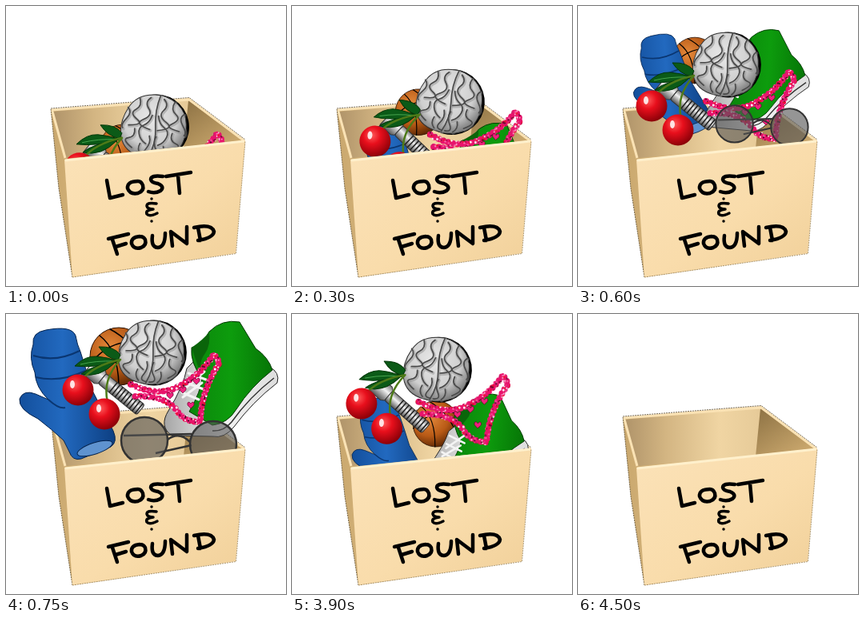
An HTML page that plays this animation: 350x350 px, repeating every 7.5 s.

```html
<!DOCTYPE html>
<html lang="en">
<head>
<meta charset="utf-8">
<title>Lost &amp; Found</title>
<style>
html, body { margin: 0; width: 100%; height: 100%; overflow: hidden; background: #fff; }
svg { display: block; width: 100vw; height: 100vh; }
.ink { fill: none; stroke: #000; stroke-linecap: round; stroke-linejoin: round; }
</style>
</head>
<body>
<svg viewBox="0 0 350 350" role="img" aria-label="Lost &amp; Found box">
<defs>
  <linearGradient id="front" x1="0" y1="0" x2="1" y2="1">
    <stop offset="0" stop-color="#fbe2b8"/><stop offset=".55" stop-color="#f9dcab"/><stop offset="1" stop-color="#f0cf98"/>
  </linearGradient>
  <linearGradient id="side" x1="0" y1="0" x2="1" y2="0">
    <stop offset="0" stop-color="#c9a76d"/><stop offset=".6" stop-color="#f0d19b"/><stop offset="1" stop-color="#f3d6a4"/>
  </linearGradient>
  <linearGradient id="backWall">
    <stop offset="0" stop-color="#b0946a"/><stop offset=".3" stop-color="#d3b582"/><stop offset=".7" stop-color="#f0d5a3"/><stop offset="1" stop-color="#e6ca98"/>
  </linearGradient>
  <linearGradient id="rightWall" x1="0" y1="0" x2=".8" y2="1">
    <stop offset="0" stop-color="#8c7143"/><stop offset="1" stop-color="#cdaa6f"/>
  </linearGradient>
  <radialGradient id="orange" cx=".35" cy=".35" r=".7">
    <stop offset="0" stop-color="#e58a3c"/><stop offset=".6" stop-color="#b85a16"/><stop offset="1" stop-color="#5a2604"/>
  </radialGradient>
  <linearGradient id="blue">
    <stop offset="0" stop-color="#134f9c"/><stop offset=".45" stop-color="#2269bf"/><stop offset="1" stop-color="#0d3f82"/>
  </linearGradient>
  <linearGradient id="green">
    <stop offset="0" stop-color="#0b850b"/><stop offset=".5" stop-color="#0d9c0d"/><stop offset="1" stop-color="#067506"/>
  </linearGradient>
  <linearGradient id="rubber">
    <stop offset="0" stop-color="#a5a5a5"/><stop offset=".5" stop-color="#f4f4f4"/><stop offset="1" stop-color="#ddd"/>
  </linearGradient>
  <linearGradient id="steel" x1="0" y1="0" x2="0" y2="1">
    <stop offset="0" stop-color="#777"/><stop offset=".4" stop-color="#f2f2f2"/><stop offset="1" stop-color="#555"/>
  </linearGradient>
  <radialGradient id="gray" cx=".42" cy=".38" r=".65">
    <stop offset="0" stop-color="#e8e8e8"/><stop offset=".65" stop-color="#cfcfcf"/><stop offset="1" stop-color="#777"/>
  </radialGradient>
  <radialGradient id="red" cx=".38" cy=".32" r=".7">
    <stop offset="0" stop-color="#ff5a5a"/><stop offset=".4" stop-color="#e80f1c"/><stop offset="1" stop-color="#8a0008"/>
  </radialGradient>
  <pattern id="lace" width="24" height="24" patternUnits="userSpaceOnUse">
    <rect width="24" height="24" fill="#e8146c"/>
  </pattern>
  <path id="heart" d="M0,4 L-4,0 Q-5,-4 -2,-4 L0,-2 L2,-4 Q5,-4 4,0Z" fill="#f0207c" stroke="#500020" stroke-width=".6"/>
  <path id="trim" d="M156,88 Q190,104 215,91 Q244,76 260,50 L267,61 Q244,95 243,135 Q222,135 213,120 Q198,101 160,103"/>
  <path id="folds" d="M6,-36 Q14,-30 8,-22 T14,-8 T5,4 M20,-35 Q16,-25 24,-20 T22,-8 T32,0 M34,-22 Q28,-16 35,-8 T39,4
    M3,-14 Q6,-4 13,-1 T18,10 T9,22 M24,4 Q22,14 31,16 T26,28 M5,12 Q2,20 8,28 T4,37 M16,22 Q20,30 14,36"/>
  <g id="sulci">
    <use href="#folds"/>
    <use href="#folds" transform="scale(-1 1) rotate(7)"/>
    <path d="M1,-40 Q-3,-20 2,0 T0,39"/>
  </g>
  <clipPath id="above"><path d="M0,0 H350 V168 H297 L74,191 H0Z"/></clipPath>
</defs>

<g stroke-linejoin="round">
  <path d="M56,129 L229,115 L299,168 L287,309 L83,339 L66,228Z" fill="url(#side)"/>
  <path d="M59,132 L228,118 L223,177 L75,190Z" fill="url(#backWall)"/>
  <path d="M228,118 L296,168 L222,178Z" fill="url(#rightWall)"/>
  <path d="M74,190 L57.500,130 L229,117 L297,168" fill="none" stroke="#fae2b4" stroke-width="3"/>
  <path d="M83,339 L66,228 L56,128 L229,114.500 L299,167" fill="none" stroke="#5a4a2c" stroke-width=".8" stroke-dasharray="2 1"/>
</g>

<g clip-path="url(#above)" stroke-linejoin="round">
  <g id="ball">
    <circle cx="141" cy="53" r="36" fill="url(#orange)" stroke="#2a1000"/>
    <path class="ink" stroke-width="1.500" d="M106,62 Q130,30 172,35 M117,27 Q140,44 141,89 M130,19 Q156,32 174,66"/>
  </g>
  <g id="mitten">
    <path d="M34,38 Q32,23 50,20 Q82,14 87,27 Q89,39 93,47 Q101,72 107,94 L134,146 Q140,160 131,166 L94,181 Q83,184 79,172 L72,158 Q57,144 40,131 Q15,119 17,106 Q22,94 37,100 L53,107 Q37,92 36,73 Q28,55 34,38Z" fill="url(#blue)" stroke="#06244e"/>
    <path d="M34,52 Q62,61 92,46 M37,79 Q68,86 99,71 M53,107 Q66,119 74,117" fill="none" stroke="#0a3671" stroke-width="2"/>
    <ellipse cx="111" cy="168" rx="23" ry="7" transform="rotate(-18 111 168)" fill="#5f93cf" stroke="#06244e"/>
  </g>
  <g id="shoe">
    <path d="M329,66 Q343,73 339,86 Q308,110 285,141 Q273,156 258,153 L207,152 Q191,140 203,121 Q222,90 226,68 L236,58 L269,135Z" fill="url(#rubber)" stroke="#222"/>
    <path d="M232,42 Q247,38 254,22 Q270,6 292,10 L312,43 Q328,54 333,70 Q306,91 288,119 Q277,137 258,139 L229,122 Q244,96 245,80 Q230,61 232,42Z" fill="url(#green)" stroke="#023802"/>
    <path d="M335,80 Q304,104 282,135 Q272,147 258,146" fill="none" stroke="#333" stroke-width="1.500"/>
    <path d="M232,42 Q248,31 254,22 Q256,39 249,49 Q239,62 245,80" fill="#0a650a"/>
    <path d="M228,74 L250,82 M225,86 L247,94 M220,98 L241,107 M248,72 L225,92 M245,86 L221,104" stroke="#f4f4f4" stroke-width="3" stroke-linecap="round"/>
  </g>
  <g id="bolt">
    <g transform="translate(107 70) rotate(39)">
      <path d="M-5,-11 L13,-11 L17,-8 V8 L13,11 H-5Z" fill="url(#steel)" stroke="#333"/>
      <rect x="17" y="-8" width="62" height="16" rx="3" fill="url(#steel)" stroke="#333"/>
      <path d="M34,0 H78" stroke="#222" stroke-width="16" stroke-dasharray="1.600 3"/>
    </g>
  </g>
  <g id="brain">
    <g transform="translate(182 48) rotate(11)">
      <ellipse cx="3" cy="0" rx="41" ry="41"/>
      <path d="M-8,-39 Q8,-43 24,-33 Q39,-23 40,-3 Q42,18 29,30 Q14,41 -7,40 Q-31,39 -38,20 Q-44,3 -36,-17 Q-29,-35 -8,-39Z" fill="url(#gray)" stroke="#333"/>
      <g fill="none" stroke-linecap="round">
        <use href="#sulci" x="1" y="1" stroke="#888" stroke-opacity=".45" stroke-width="4"/>
        <use href="#sulci" stroke="#484848" stroke-width="1.600"/>
      </g>
    </g>
  </g>
  <g id="cherries">
    <path d="M140,59 Q111,68 86,65 Q99,52 113,53 Q127,54 140,59Z M140,58 Q125,55 116,41 Q135,40 143,51Z M137,60 Q117,81 94,75 Q108,64 137,60Z" fill="#0b5a17" stroke="#033808"/>
    <path d="M93,63 Q113,58 136,59" fill="none" stroke="#46a34d"/>
    <path d="M95,82 Q110,64 143,57 Q120,82 127,110" fill="none" stroke="#4d7a18" stroke-width="2.500"/>
    <circle cx="90" cy="95" r="19.500" fill="url(#red)"/>
    <circle cx="123" cy="125" r="19.500" fill="url(#red)"/>
    <g fill="#fff" opacity=".85"><ellipse cx="83" cy="88" rx="3" ry="5"/><ellipse cx="116" cy="118" rx="3" ry="5"/></g>
  </g>
  <g id="thong">
    <g fill="none" stroke="url(#lace)" stroke-linecap="round">
      <use href="#trim" stroke-width="4"/>
      <use href="#trim" stroke-width="8" stroke-dasharray="0 6"/>
    </g>
    <use href="#heart" x="205" y="102"/><use href="#heart" x="221" y="95"/>
    <use href="#heart" x="238" y="84"/><use href="#heart" x="231" y="114"/>
  </g>
  <g id="glasses" stroke="#333" stroke-width="2.500">
    <path d="M147,152 L232,150 M187,174 L232,164 M202,157 Q216,146 230,160" fill="none"/>
    <circle cx="173" cy="158" r="29" fill="#555" fill-opacity=".62"/>
    <circle cx="259" cy="163" r="29" fill="#555" fill-opacity=".62"/>
  </g>
</g>

<path d="M73,192 L299,168 L287,309 L83,339Z" fill="url(#front)"/>
<path d="M74,193 L298,169" stroke="#fff0cc" stroke-width="3"/>
<path d="M83,339 L287.500,309.500 L299,169" fill="none" stroke="#9a8152" stroke-width=".8" stroke-dasharray="2 1"/>
<g class="ink" stroke-width="4.500">
  <path d="M126,218 L130,240 L146,236 M165,219 Q151,219 152,228 Q155,236 165,234 Q173,231 171,224 Q169,219 165,219
    M196,213 Q181,211 181,217 Q182,221 190,222 Q199,226 193,231 Q186,235 178,232 M200,213 L231,208 M215,212 L217,234"/>
  <path d="M188,247 Q176,245 176,250 Q177,254 184,254 Q174,255 176,260 Q179,264 189,259 M182,241 v.1 M182,269 v.1" stroke-width="3.500"/>
  <path d="M128,291 L153,285 M133,292 L139,310 M137,301 L150,297 M167,288 Q156,289 157,297 Q160,305 169,302 Q176,299 174,292 Q172,288 167,288
    M183,287 Q181,302 190,302 Q199,301 199,284 M208,300 L206,282 L226,297 L226,276 M240,277 L243,293 M235,277 Q257,272 260,282 Q259,290 240,293"/>
</g>
</svg>
<script>
const LOOP = 7500, BEAT = 150, SINK_AT = 3750;
const TOP = 5, SETTLED = 6, EMPTY = 11;

// Poses are [dx, dy, turn, scale] around "at": gathered just before the items
// spread out, and settled just after. Pace is the climbing speed.
const items = {
  ball: { at: [141, 53], gather: [5, 15, 0, .8], settle: [33, 45, 0, .8], pace: 1.4 },
  mitten: { at: [86, 97], gather: [38, 0, -4, .8], pace: 2.5 },
  shoe: { at: [270, 85], gather: [-43, 11, 4, .89], pace: 2.5 },
  bolt: { at: [138, 96], gather: [0, 30], settle: [-6, -6] },
  brain: { at: [182, 48], gather: [3, 25], settle: [-7, -7] },
  cherries: { at: [115, 92], gather: [2, 30], settle: [-9, -10] },
  thong: { at: [210, 95], gather: [4, 31], settle: [-4, -4] },
  glasses: { at: [216, 160], gather: [14, -11, 0, .8], pace: 2.5 }
};

function sprinkleLace(count) {
  let seed = 7;
  const random = () => (seed = seed * 16807 % 2147483647) / 2147483647;
  const colors = ["#fff", "#f01020", "#5a0428", "#ff7ab8"];
  const dots = Array.from({ length: count }, (_, i) =>
    `<circle cx="${random() * 24}" cy="${random() * 24}" r="${.6 + random() * .7}" fill="${colors[i % colors.length]}"/>`);
  document.getElementById("lace").innerHTML += dots.join("");
}

function stepAt(time) {
  return time < SINK_AT
    ? Math.min(TOP, Math.floor(time / BEAT))
    : Math.min(EMPTY, SETTLED + Math.floor((time - SINK_AT) / BEAT));
}

const depth = step => 104 * (1 - (step / TOP) ** 1.3);

function poseAt({ gather, settle = gather, pace = 1 }, step) {
  if (step === TOP) return [0, 0, 0, 1];
  const rising = step < TOP;
  const [x, y, turn = 0, scale = 1] = rising ? gather : settle;
  const drop = rising ? depth(step) - depth(TOP - 1) : 28 * (step - SETTLED);
  const sway = 12 * Math.sin(Math.PI * (rising ? step / 4 : (step - SETTLED) / 6));
  return [x + sway, y + pace * drop, turn + sway * .4, scale];
}

function show(step) {
  for (const [id, item] of Object.entries(items)) {
    const [cx, cy] = item.at;
    const [x, y, turn, scale] = poseAt(item, step);
    const el = document.getElementById(id);
    el.style.display = step === EMPTY ? "none" : "";
    el.setAttribute("transform",
      `translate(${cx + x} ${cy + y}) rotate(${turn}) scale(${scale}) translate(${-cx} ${-cy})`);
  }
}

sprinkleLace(60);
const origin = performance.now();
function tick() {
  show(stepAt((performance.now() - origin) % LOOP));
  requestAnimationFrame(tick);
}
tick();
</script>
</body>
</html>
```
